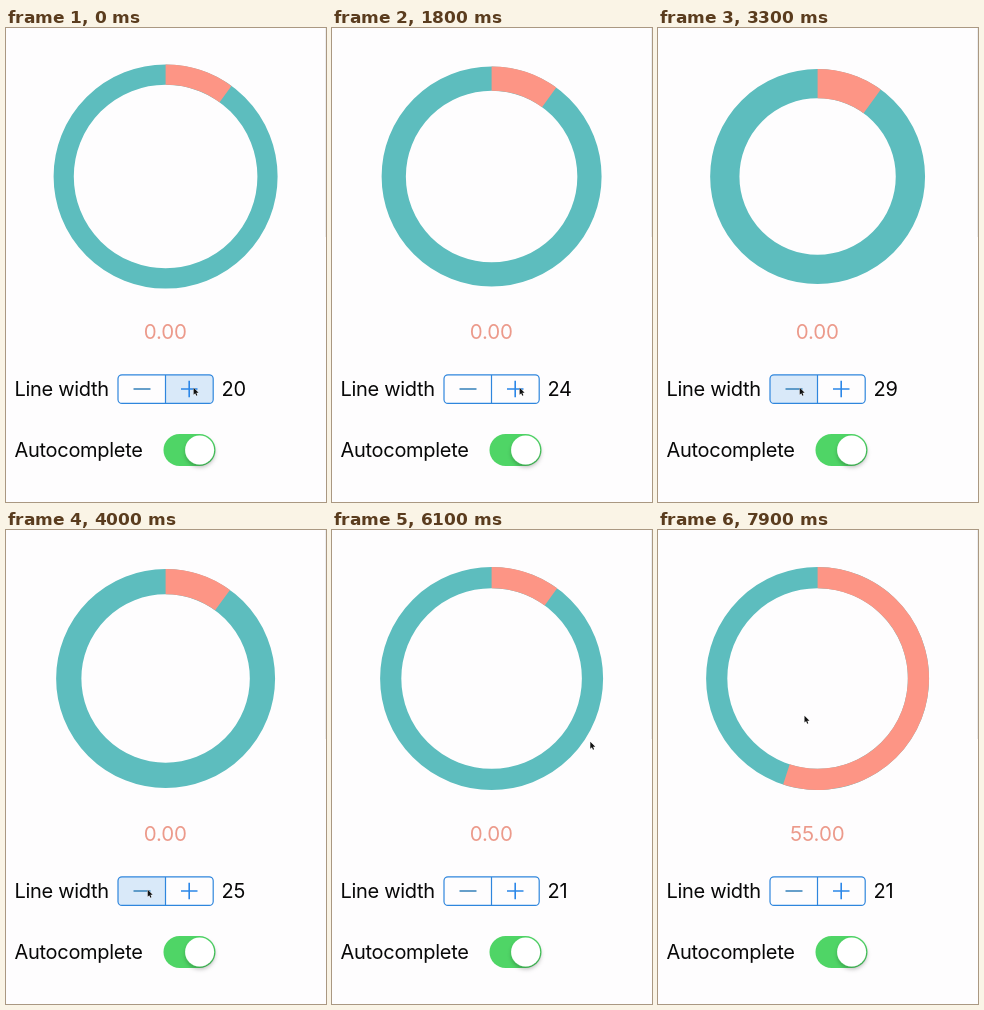
An HTML page for the animation above (8 s loop, 320x474 px).

```html
<!DOCTYPE html>
<html lang="en">
<head>
<meta charset="utf-8">
<title>Circular slider</title>
<style>
  html, body { margin: 0; width: 100%; height: 100%; overflow: hidden; background: #fefdfe; }
  svg { display: block; width: 320px; height: 474px; }
  text { font-family: Inter, "Open Sans", sans-serif; font-size: 20px; letter-spacing: -.3px; fill: #080808; }
  #value { font-size: 20.5px; letter-spacing: -.1px; text-anchor: middle; fill: #ec9a8b; }
  .press { fill: #d9e9f9; }
</style>
</head>
<body>
<svg viewBox="0 0 320 474">
  <defs>
    <filter id="shadow" x="-30%" y="-30%" width="160%" height="170%">
      <feDropShadow dx=".5" dy="2.5" stdDeviation="2" flood-color="#000" flood-opacity=".28"/>
    </filter>
  </defs>
  <rect x="319" width="1" height="209" fill="#ededef"/>

  <circle id="track" cx="159.6" cy="148.5" fill="none" stroke="#5dbdbe"/>
  <path id="arc" fill="none" stroke="#fd9585"/>
  <text id="value" x="159.3" y="311"></text>

  <text x="8.5" y="368">Line width</text>
  <text id="width" x="215.5" y="368"></text>
  <path id="minus" class="press" d="M159.5 347H116a4 4 0 0 0-4 4v20a4 4 0 0 0 4 4h43.5z"/>
  <path id="plus" class="press" d="M159.5 347H203a4 4 0 0 1 4 4v20a4 4 0 0 1-4 4h-43.5z"/>
  <g fill="none" stroke="#2f86dd" stroke-width="1.2">
    <rect x="112" y="346.8" width="95.2" height="28.6" rx="4"/>
    <path d="M159.5 347v28"/>
    <path d="M127.5 361h17" stroke="#3f88bd" stroke-width="1.6"/>
    <path d="M175 361h16.5M183.2 352.8v16.5" stroke="#2b87e8" stroke-width="1.6"/>
  </g>

  <text x="8.5" y="429">Autocomplete</text>
  <rect x="157.5" y="406" width="52" height="32" rx="16" fill="#4fd566"/>
  <circle cx="193.6" cy="422" r="14.5" fill="#fff" filter="url(#shadow)"/>

  <path id="cursor" d="M0 0V6.9L1.6 5.4 2.7 8 3.8 7.5 2.7 5H5Z" fill="#111" stroke="#fff" stroke-width=".7" paint-order="stroke"/>
</svg>
<script>
const LOOP = 8000, TICK = 100, HOLD = 75;
const CX = 159.6, CY = 148.5, SCALE = 1.01;
const GRAB = 6500, RELEASE = 7900;
const $ = id => document.getElementById(id);

const clamp = (v, lo, hi) => Math.min(hi, Math.max(lo, v));
const mix = (a, b, p) => a + (b - a) * p;
const progress = (t, from, to) => {
  const p = clamp((t - from) / (to - from), 0, 1);
  return p * p * (3 - 2 * p);
};
const point = (percent, r) => {
  const a = percent / 50 * Math.PI;
  return [CX + r * Math.sin(a), CY - r * Math.cos(a)];
};

// plus is tapped faster and faster, minus at a steady pace
const plusTap = n => 2750 * (n / 10) ** 0.6;
const minusTap = n => 3300 + 160 * (n - 1);
const plusCount = t => clamp(Math.floor(10 * (t / 2750) ** (1 / 0.6)), 0, 10);
const minusCount = t => clamp(Math.floor((t - 3300) / 160) + 1, 0, 9);
const isHeld = (t, tap) => t >= tap && t < tap + HOLD;

const percentAt = t => mix(10, 55.4, progress(t, GRAB, RELEASE));

// pointer stops: [departure, arrival, x, y]
const stops = [
  [2850, 3200, 141.7, 359.8],
  [5300, 6100, 258.3, 211.8],
  [6100, GRAB, ...point(10, 95)]
];

function cursorAt(t) {
  // while dragging, the pointer drifts inside the ring
  if (t > GRAB) return point(percentAt(t), mix(95, 39.4, progress(t, GRAB, RELEASE)));
  return stops.reduce(([x, y], [from, to, nx, ny]) => {
    const p = progress(t, from, to);
    return [mix(x, nx, p), mix(y, ny, p)];
  }, [187.6, 359.8]);
}

function draw(t) {
  const ups = plusCount(t), downs = minusCount(t);
  const width = 20 + ups - downs;
  const r = 122.1 - width * SCALE;
  const percent = Math.round(percentAt(t));
  const [x, y] = point(percent, r);

  $("track").setAttribute("r", r);
  $("arc").setAttribute("d", `M${CX} ${CY - r}A${r} ${r} 0 ${+(percent > 50)} 1 ${x} ${y}`);
  for (const id of ["track", "arc"]) $(id).setAttribute("stroke-width", width * SCALE);

  $("value").textContent = (t > GRAB ? percent : 0).toFixed(2);
  $("width").textContent = width;
  $("plus").style.opacity = +isHeld(t, plusTap(ups));
  $("minus").style.opacity = +(downs > 0 && isHeld(t, minusTap(downs)));
  $("cursor").setAttribute("transform", `translate(${cursorAt(t).join(" ")})`);
}

const start = performance.now();
function frame() {
  const t = (performance.now() - start) % LOOP;
  draw(Math.floor(t / TICK) * TICK);
  requestAnimationFrame(frame);
}
frame();
</script>
</body>
</html>
```
